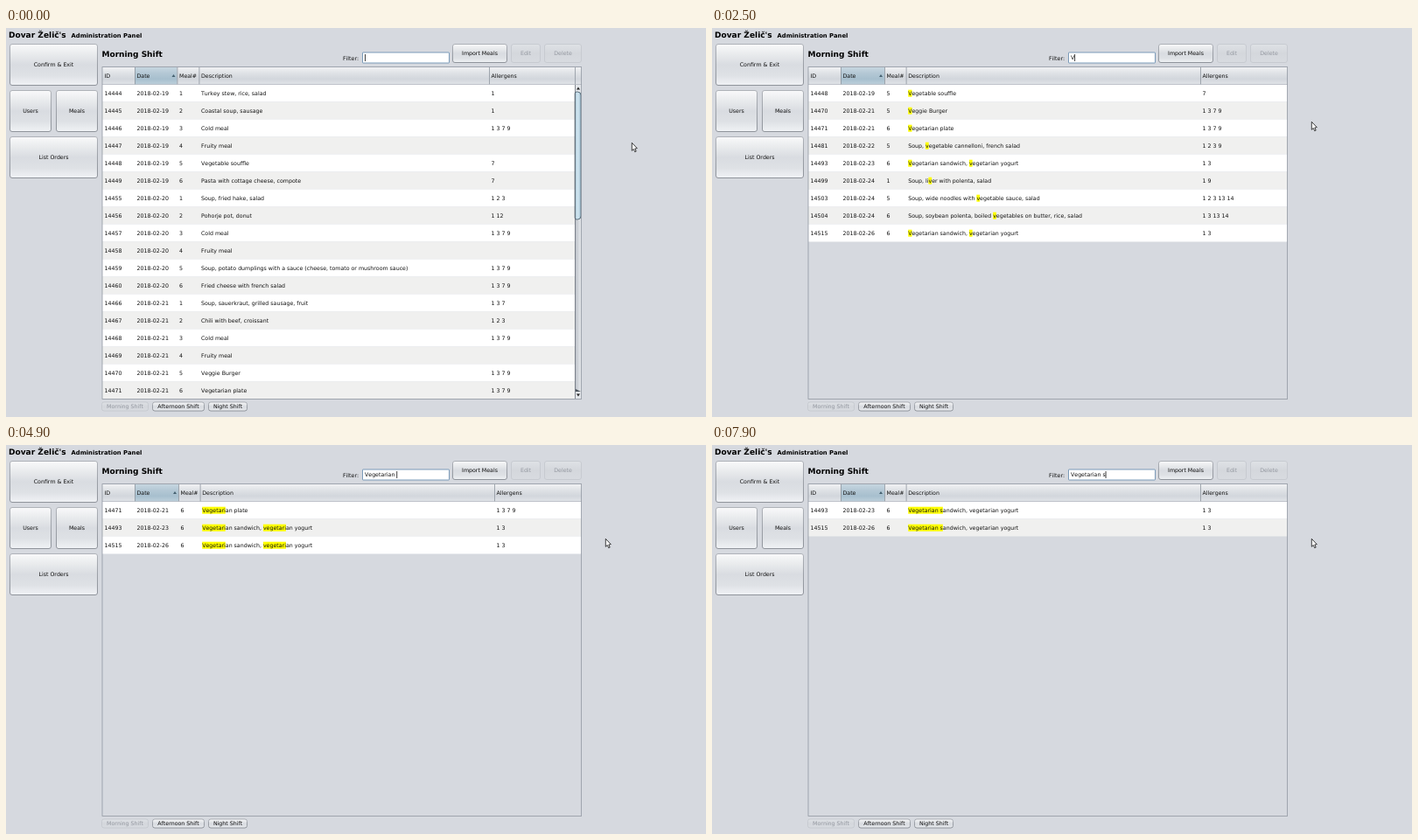
An HTML page with a canvas for the animation above (8 s loop, 800 by 445 pixels).

```html
<!DOCTYPE html>
<html lang="en">
<head>
<meta charset="utf-8">
<title>Meal administration</title>
<style>
html, body { margin: 0; width: 100%; height: 100%; overflow: hidden; background: #d6d9df; }
canvas { display: block; }
</style>
</head>
<body>
<canvas id="stage" width="800" height="445"></canvas>
<script>
const ctx = document.getElementById('stage').getContext('2d');
ctx.fontKerning = 'none';
ctx.textRendering = 'geometricPrecision';

const LOOP = 8000, FRAME = 100, BLINK = 500, FILTER_LAG = 100;
const TOP = 64.5, ROW = 20, VISIBLE = 18;
const FONT = '6.27px "DejaVu Sans", sans-serif';
const bold = size => `bold ${size}px "DejaVu Sans", sans-serif`;

// One line per day, six meals each; "description|allergens", blank where never listed.
const meals = `Turkey stew, rice, salad|1;Coastal soup, sausage|1;Cold meal|1 3 7 9;Fruity meal;Vegetable souffle|7;Pasta with cottage cheese, compote|7
Soup, fried hake, salad|1 2 3;Pohorje pot, donut|1 12;Cold meal|1 3 7 9;Fruity meal;Soup, potato dumplings with a sauce (cheese, tomato or mushroom sauce)|1 3 7 9;Fried cheese with french salad|1 3 7 9
Soup, sauerkraut, grilled sausage, fruit|1 3 7;Chili with beef, croissant|1 2 3;Cold meal|1 3 7 9;Fruity meal;Veggie Burger|1 3 7 9;Vegetarian plate|1 3 7 9
;;;;Soup, vegetable cannelloni, french salad|1 2 3 9;
;;;;;Vegetarian sandwich, vegetarian yogurt|1 3
Soup, liver with polenta, salad|1 9;;;;Soup, wide noodles with vegetable sauce, salad|1 2 3 13 14;Soup, soybean polenta, boiled vegetables on butter, rice, salad|1 3 13 14
;;;;;Vegetarian sandwich, vegetarian yogurt|1 3`.split('\n').flatMap((line, k) =>
  line.split(';').map((entry, i) => {
    const [desc, allergens = ''] = entry.split('|');
    const day = 19 + k + (k > 5 ? 1 : 0); // no meals on Sunday
    return { id: 14444 + 11 * k + i, date: `2018-02-${day}`, meal: i + 1, desc, allergens };
  })
).filter(m => m.desc);

// Each burst turns the previous text into its own, one key per interval (0: at once).
const bursts = [
  { at: 2500, every: 0, text: 'V' },
  { at: 2600, every: 200, text: 'Vege' },
  { at: 3300, every: 200, text: 'Vegeta' },
  { at: 4400, every: 200, text: 'Vegetari' },
  { at: 4900, every: 0, text: 'Vegetarian ' },
  { at: 5100, every: 125, text: 'Vegetarian plate' },
  { at: 6000, every: 150, text: 'Vegetarian p' },
  { at: 6900, every: 0, text: 'Vegetarian ' },
  { at: 7800, every: 0, text: 'Vegetarian s' }
];

function typedAt(t) {
  let value = '', lastKey = -300;
  for (const { at, every, text } of bursts) {
    if (t < at) break;
    const total = Math.abs(text.length - value.length);
    const keys = every ? Math.min(total, 1 + Math.floor((t - at) / every)) : total;
    lastKey = at + (keys - 1) * every;
    value = text.length > value.length
      ? text.slice(0, value.length + keys)
      : value.slice(0, value.length - keys);
  }
  return { value, lastKey };
}

const START = [715, 131], FIELD = [440, 34], REST = [685, 107];

function pointerAt(t) {
  const [from, to, u] = t < 600 ? [START, FIELD, t / 500] : [FIELD, REST, (t - 600) / 300];
  const eased = 1 - (1 - Math.min(1, u)) ** 2;
  return from.map((a, i) => a + (to[i] - a) * eased);
}

function rect(x, y, w, h, fill) {
  ctx.fillStyle = fill;
  ctx.fillRect(x, y, w, h);
}

function text(str, x, y, color = '#111', font = FONT, align = 'left') {
  ctx.font = font;
  ctx.textAlign = align;
  ctx.fillStyle = color;
  ctx.fillText(str, x, y);
}

function gradient(x0, y0, x1, y1, colors) {
  const g = ctx.createLinearGradient(x0, y0, x1, y1);
  colors.forEach((c, i) => g.addColorStop(i / (colors.length - 1), c));
  return g;
}
const down = (y, h, ...colors) => gradient(0, y, 0, y + h, colors);
const across = (x, w, ...colors) => gradient(x, 0, x + w, 0, colors);

function paint(fill, stroke) {
  ctx.fillStyle = fill;
  ctx.fill();
  if (!stroke) return;
  ctx.strokeStyle = stroke;
  ctx.lineWidth = 0.8;
  ctx.stroke();
}

function polygon(points, fill, stroke) {
  ctx.beginPath();
  points.forEach(([x, y]) => ctx.lineTo(x, y));
  ctx.closePath();
  paint(fill, stroke);
}

const arrow = (x, y, dir, color) =>
  polygon([[x - 2, y - 1.5 * dir], [x, y + 1.5 * dir], [x + 2, y - 1.5 * dir]], color);

function box(x, y, w, h, r, fill, stroke) {
  ctx.beginPath();
  ctx.roundRect(x + 0.5, y + 0.5, w - 1, h - 1, r);
  paint(fill, stroke);
}

function button(label, x, y, w, h, disabled) {
  const fill = disabled
    ? down(y, h, '#dfe2e6', '#d4d7dc', '#d8dbe0')
    : down(y, h, '#fafafb', '#e9ebed', '#d9dce1', '#dee1e5', '#f1f3f6');
  box(x, y, w, h, 2.5, fill, disabled ? '#c3c7cd' : down(y, h, '#a0a4ab', '#797e86'));
  text(label, x + w / 2, y + h / 2 + 2.2, disabled ? '#9498a0' : '#111', FONT, 'center');
}

function chrome() {
  rect(0, 0, 800, 445, '#d6d9df');
  text("Dovar Želič's", 3, 11, '#000', bold(9.05));
  text('Administration Panel', 74.5, 11, '#000', bold(6.82));
  text('Morning Shift', 109.5, 33, '#000', bold(9.03));
  button('Confirm & Exit', 4, 18, 101, 48);
  button('Users', 4, 71, 48, 48);
  button('Meals', 57, 71, 48, 48);
  button('List Orders', 4, 124, 101, 48);
  button('Import Meals', 510, 18, 63, 22);
  button('Edit', 577, 18, 34, 22, true);
  button('Delete', 615, 18, 43, 22, true);
  button('Morning Shift', 109, 427.5, 54, 11, true);
  button('Afternoon Shift', 167, 427.5, 60, 11);
  button('Night Shift', 231, 427.5, 45, 11);
}

function field(value, caret) {
  text('Filter:', 385, 36.8);
  box(407, 27.5, 100, 13, 0.5, '#fff', '#5f87ab');
  text(value, 410, 36.3);
  if (caret) rect(410 + ctx.measureText(value).width, 30, 0.8, 8, '#111');
}

function header(cols, right, hover) {
  const [, date, meal, desc, allergens] = cols;
  rect(110, 45, 548, 19.5, down(45, 20, '#f0f1f3', '#dfe2e6', '#d2d6dc', '#e2e5e9'));
  rect(date, 45, meal - date, 19.5, down(45, 20, '#c6d6e0', '#b4c8d5', '#a7bfce', '#bed1dc'));
  if (hover) rect(desc, 45, allergens - desc, 19.5, down(45, 20, '#fafbfc', '#e8eaed', '#eff1f4'));
  ['ID', 'Date', 'Meal#', 'Description', 'Allergens'].forEach((label, i) => {
    if (i) rect(cols[i], 45, 0.8, 19.5, '#8f969f');
    text(label, cols[i] + 2.5, 56.8);
  });
  if (right < 657) rect(right, 45, 0.8, 19.5, '#8f969f');
  arrow(meal - 4, 54.5, -1, '#45606f');
  rect(110, 64, 548, 0.6, '#a5abb4');
}

function description(str, x, y, query) {
  ctx.font = FONT;
  const lower = str.toLowerCase();
  const width = s => ctx.measureText(s).width;
  for (let i = query ? lower.indexOf(query) : -1; i >= 0; i = lower.indexOf(query, i + 1)) {
    rect(x + width(str.slice(0, i)), y + 6.2, width(str.substr(i, query.length)), 8, '#ff0');
  }
  text(str, x, y + 12.5);
}

function scrollbar(hover) {
  const edge = hover ? '#c2d8e5' : '#a8c4d4';
  rect(650, 65, 7.5, 359, across(650, 7, '#b9bec6', '#e4e7ea'));
  for (const [y, dir] of [[65, -1], [416, 1]]) {
    rect(650, y, 7.5, 8, '#e3e6ea');
    arrow(654, y + 4, dir, '#222');
  }
  ctx.beginPath();
  ctx.roundRect(650.2, 73, 6.9, 146, [2, 4, 4, 2]);
  paint(across(650, 7, edge, hover ? '#e4f2f9' : '#d0e5f0', edge), '#3f5361');
  rect(650, 65, 0.7, 359, '#5c646d');
  polygon([[651, 413], [657, 416], [651, 416]], '#4b535b');
}

function table(query, headerHover, thumbHover) {
  const rows = meals.filter(m => m.desc.toLowerCase().includes(query));
  const full = rows.length > VISIBLE;
  const cols = full ? [110, 147, 195.5, 220.5, 552] : [110, 147, 197, 221.7, 558];
  const right = full ? 650 : 657.5;
  rows.slice(0, VISIBLE).forEach((m, i) => {
    const y = TOP + i * ROW;
    rect(110, y, right - 110, Math.min(ROW, 424 - y), i % 2 ? '#f0f0ef' : '#fff');
    [m.id, m.date, m.meal, '', m.allergens].forEach((s, c) => text(s, cols[c] + 2.6, y + 12.5));
    description(m.desc, cols[3] + 2.5, y, query);
  });
  header(cols, right, headerHover);
  if (full) scrollbar(thumbHover);
  ctx.strokeStyle = '#9298a2';
  ctx.lineWidth = 0.8;
  ctx.strokeRect(110, 44.6, 547.6, 379.8);
}

function drawPointer(x, y) {
  if (y < 41 && x > 407 && x < 506) {
    rect(x, y - 4, 0.8, 8, '#111');
    for (const end of [-4, 4]) rect(x - 1.5, y + end, 3.8, 0.7, '#111');
    return;
  }
  const shape = [[0, 0], [0, 9], [2, 7.2], [3.4, 10.4], [4.9, 9.8], [3.5, 6.7], [6, 6.3]];
  polygon(shape.map(([a, b]) => [x + 0.3 + a, y + 0.3 + b]), '#fff', '#111');
}

function draw(t) {
  const { value, lastKey } = typedAt(t);
  // The first letter filters at once, later keys a moment after typing.
  const query = (typedAt(t - FILTER_LAG).value || value).trim().toLowerCase();
  const caret = Math.floor((t - lastKey) / BLINK) % 2 === 0;
  const [x, y] = pointerAt(t);
  const overHeader = y >= 45 && y < 65 && x < 552;
  const overThumb = x >= 650 && x < 658 && y >= 73 && y < 219;
  chrome();
  field(value, caret);
  table(query, overHeader, overThumb);
  drawPointer(x, y);
}

const start = performance.now();
function tick() {
  const t = (performance.now() - start) % LOOP;
  draw(Math.floor(t / FRAME) * FRAME);
  requestAnimationFrame(tick);
}
tick();
</script>
</body>
</html>
```
